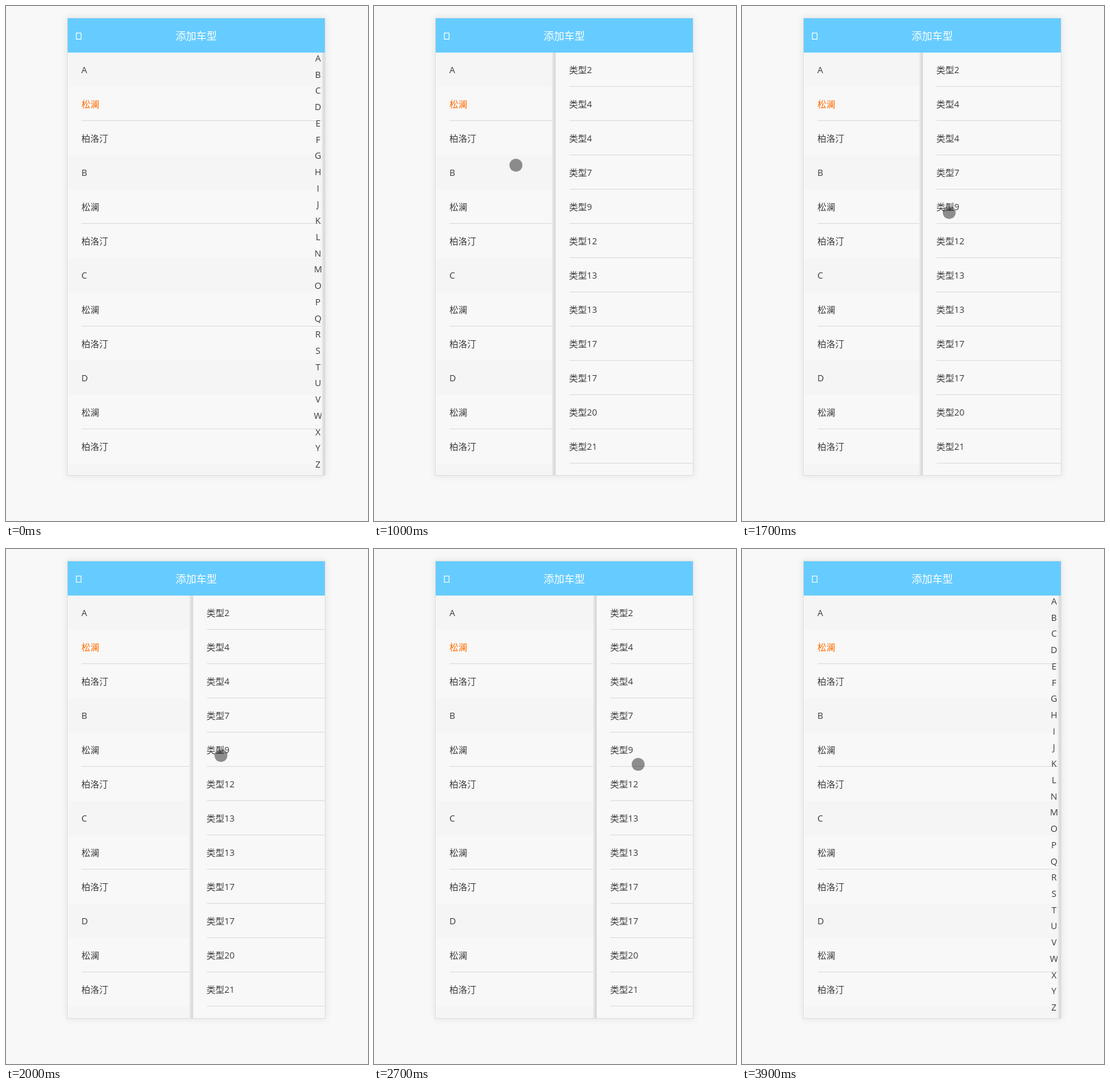
Recreate the animation shown at these times as an HTML page. Size 528 by 752 pixels, loop 4800 ms.

```html
<!DOCTYPE html>
<html lang="zh">
<head>
<meta charset="utf-8">
<style>
  html, body { margin: 0; height: 100%; overflow: hidden; background: #f8f8f8; }
  svg { display: block; font: 13px "Open Sans", "Noto Sans CJK SC", "Noto Sans CJK", sans-serif; fill: #3c3c3c; }
  .frame { fill: #f8f8f8; stroke: #dcdfe2; filter: drop-shadow(0 0 5px #e2e2e2); }
  .line { fill: #dcdcdc; }
  .head { fill: #f5f5f5; }
  .chosen { fill: #ff6a00; }
  .title { font-size: 15px; font-weight: 500; fill: #fff; }
  .index { text-anchor: middle; }
</style>
</head>
<body>
<svg id="stage" width="528" height="752" viewBox="0 0 528 752"></svg>
<script>
const LOOP = 4800, STEP = 100;
const TOP = 68, ROW = 50, OPEN = 204, SHUT = 466;
const BRANDS = ["松澜", "柏洛汀"];
const TYPES = [2, 4, 4, 7, 9, 12, 13, 13, 17, 17, 20, 21];
const INDEX = "ABCDEFGHIJKLNMOPQRSTUVWXYZ";

const text = (x, y, s, cls = "") => `<text x="${x}" y="${y}" class="${cls}">${s}</text>`;
const rect = (x, y, w, h, cls) => `<rect x="${x}" y="${y}" width="${w}" height="${h}" class="${cls}"/>`;

function brandList() {
  let out = "";
  for (let i = 0; i < 13; i++) {
    const y = TOP + i * ROW, kind = i % 3;
    if (kind === 0) out += rect(90, y, 375, ROW, "head") + text(110, y + 30, INDEX[i / 3]);
    else out += text(110, y + 30, BRANDS[kind - 1], i === 1 ? "chosen" : "");
    if (kind === 1) out += rect(110, y + 49, 355, 1, "line");
  }
  return out;
}

const typeList = () => TYPES.map((n, i) =>
  text(19.5, TOP + i * ROW + 30, "类型" + n) + rect(20, TOP + i * ROW + 49, 375, 1, "line")).join("");

const letterIndex = () => [...INDEX].map((c, i) => text(455, 81 + i * 23.72, c, "index")).join("");

document.getElementById("stage").innerHTML = `
  <defs>
    <clipPath id="view"><rect x="90" y="68" width="375" height="617"/></clipPath>
    <linearGradient id="edge">
      <stop offset="0" stop-color="#f4f4f4" stop-opacity=".6"/>
      <stop offset=".25" stop-color="#e8e8e8"/>
      <stop offset=".6" stop-color="#dcdcdc"/>
      <stop offset="1" stop-color="#dadada"/>
    </linearGradient>
  </defs>
  <rect x="89.5" y="17.5" width="376" height="668" class="frame"/>
  <rect x="90" y="18" width="375" height="50" fill="#6cf"/>
  <rect x="102.5" y="39.5" width="7" height="9" fill="none" stroke="#fff"/>
  ${text(247.5, 49, "添加车型", "title")}
  <g clip-path="url(#view)">
    ${brandList()}
    ${letterIndex()}
    <rect id="tap" x="110" y="118" width="365" height="50" rx="3" fill="#33b5e5" fill-opacity=".38"/>
    <g id="panel">
      <rect x="-6" y="68" width="6" height="617" fill="url(#edge)"/>
      <rect y="68" width="375" height="617" fill="#f8f8f8"/>
      ${typeList()}
    </g>
  </g>
  <circle id="cursor" r="9.5" fill-opacity=".43" fill="#000"/>
  <circle id="ring" cx="172.5" cy="163.5" r="10.2" fill="none" stroke="#fff" stroke-opacity=".45" stroke-width="1.5"/>`;

const [tap, panel, cursor, ring] =
  ["tap", "panel", "cursor", "ring"].map(id => document.getElementById(id));

const linear = u => u;
const smooth = u => u * u * (3 - 2 * u);
const easeOut = n => u => 1 - (1 - u) ** n;

// Keys: [time, values, easing towards this key]
const panelKeys = [
  [0, [SHUT]], [670, [SHUT]], [1150, [OPEN], smooth],
  [1400, [OPEN]], [1800, [275], smooth],
  [1950, [275]], [2400, [OPEN], smooth],
  [2500, [OPEN]], [3100, [389], easeOut(2.62)],
  [3250, [389]], [3800, [SHUT], smooth], [LOOP, [SHUT]]
];
const cursorKeys = [
  [0, [472.5, 63.5]], [100, [472.5, 63.5]], [600, [172.5, 163.5], smooth],
  [700, [172.5, 163.5]], [1300, [241.5, 301.5], smooth],
  [1400, [241.5, 301.5]], [1800, [313.5, 301.5], smooth],
  [2000, [313.5, 301.5]], [2400, [252.5, 314.5], smooth],
  [2500, [252.5, 314.5]], [3100, [437.5, 314.5], easeOut(3.12)],
  [3200, [437.5, 314.5]], [3800, [497, 179.5], smooth], [LOOP, [497, 179.5]]
];

function at(keys, t) {
  const i = keys.findIndex(k => k[0] > t);
  const [t0, from] = keys[i - 1], [t1, to, ease = linear] = keys[i];
  const u = ease((t - t0) / (t1 - t0));
  return from.map((v, j) => v + (to[j] - v) * u);
}

const show = (el, on) => el.setAttribute("visibility", on ? "visible" : "hidden");

function draw(now) {
  const t = Math.floor(now % LOOP / STEP) * STEP;
  const [x] = at(panelKeys, t), [cx, cy] = at(cursorKeys, t);
  panel.setAttribute("transform", `translate(${Math.round(x)} 0)`);
  cursor.setAttribute("cx", cx);
  cursor.setAttribute("cy", cy);
  show(cursor, t >= 100 && t < 3900);
  show(tap, t >= 700 && t < 900);
  show(ring, t === 700);
}

let start;
function tick(now) {
  start ??= now;
  draw(now - start);
  requestAnimationFrame(tick);
}
draw(0);
requestAnimationFrame(tick);
</script>
</body>
</html>
```
